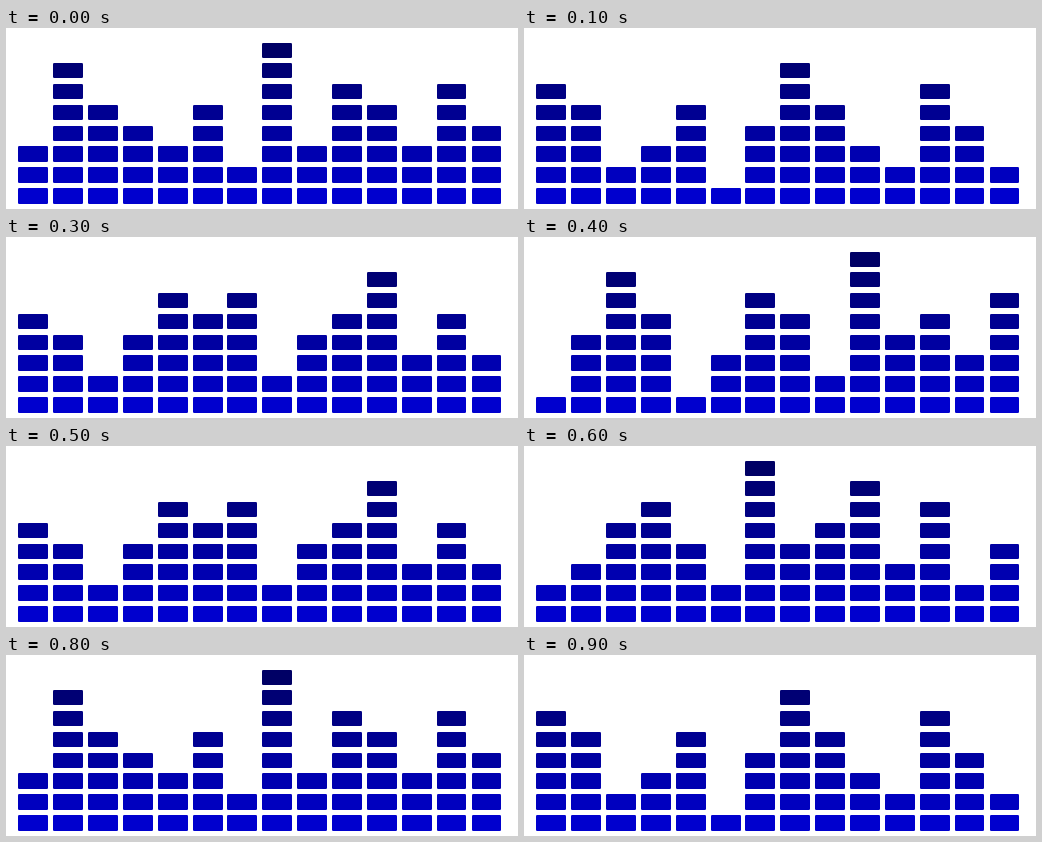
These frames come from a looping animation (512x181 px, 1 s). An HTML page:

```html
<!DOCTYPE html>
<html lang="en">
<head>
<meta charset="utf-8">
<title>Equalizer</title>
<style>
  html, body { margin: 0; width: 100%; height: 100%; overflow: hidden; background: #fff; }
  svg { display: block; width: 100vw; height: 100vh; }
</style>
</head>
<body>
<svg id="stage" viewBox="0 0 512 181"></svg>
<script>
const SVG_NS = 'http://www.w3.org/2000/svg';
const COLS = 14;
const ROWS = 8;
const STEP = 100;
const BEATS = 10;

// Key poses: one digit per column, the number of lit blocks
const poses = [
  '37543528365364',
  '65235147532642',
  '23564284573624',
  '54246562457353',
  '14751365284536'
];
const last = poses.length - 1;

const stage = document.getElementById('stage');
const range = (count, make) => Array.from({ length: count }, (_, i) => make(i));

// Evenly spaced edges, snapped to whole pixels
const edge = (first, pitch, i) => Math.floor(first + pitch * i);

function addBlock(col, row) {
  const x = edge(12.55, 34.9, col);
  const y = edge(160.5, -20.78, row);
  const attrs = {
    x, y,
    width: edge(42.95, 34.83, col) - x,
    height: edge(176, -20.85, row) - y,
    rx: 1.3,
    fill: `rgb(0,0,${206 - 15 * row})`
  };
  const block = document.createElementNS(SVG_NS, 'rect');
  for (const name in attrs) block.setAttribute(name, attrs[name]);
  stage.appendChild(block);
  return block;
}

const columns = range(COLS, col => range(ROWS, row => addBlock(col, row)));

// Sweep forth and back through the poses
function poseAt(ms) {
  const beat = Math.floor(ms / STEP) % BEATS;
  return poses[last - Math.abs(last - beat % (2 * last))];
}

function draw(ms) {
  const pose = poseAt(ms);
  columns.forEach((blocks, col) => {
    blocks.forEach((block, row) => {
      block.setAttribute('visibility', row < +pose[col] ? 'visible' : 'hidden');
    });
  });
}

const start = performance.now();

function tick(now) {
  draw(Math.max(0, now - start));
  requestAnimationFrame(tick);
}

draw(0);
requestAnimationFrame(tick);
</script>
</body>
</html>
```
